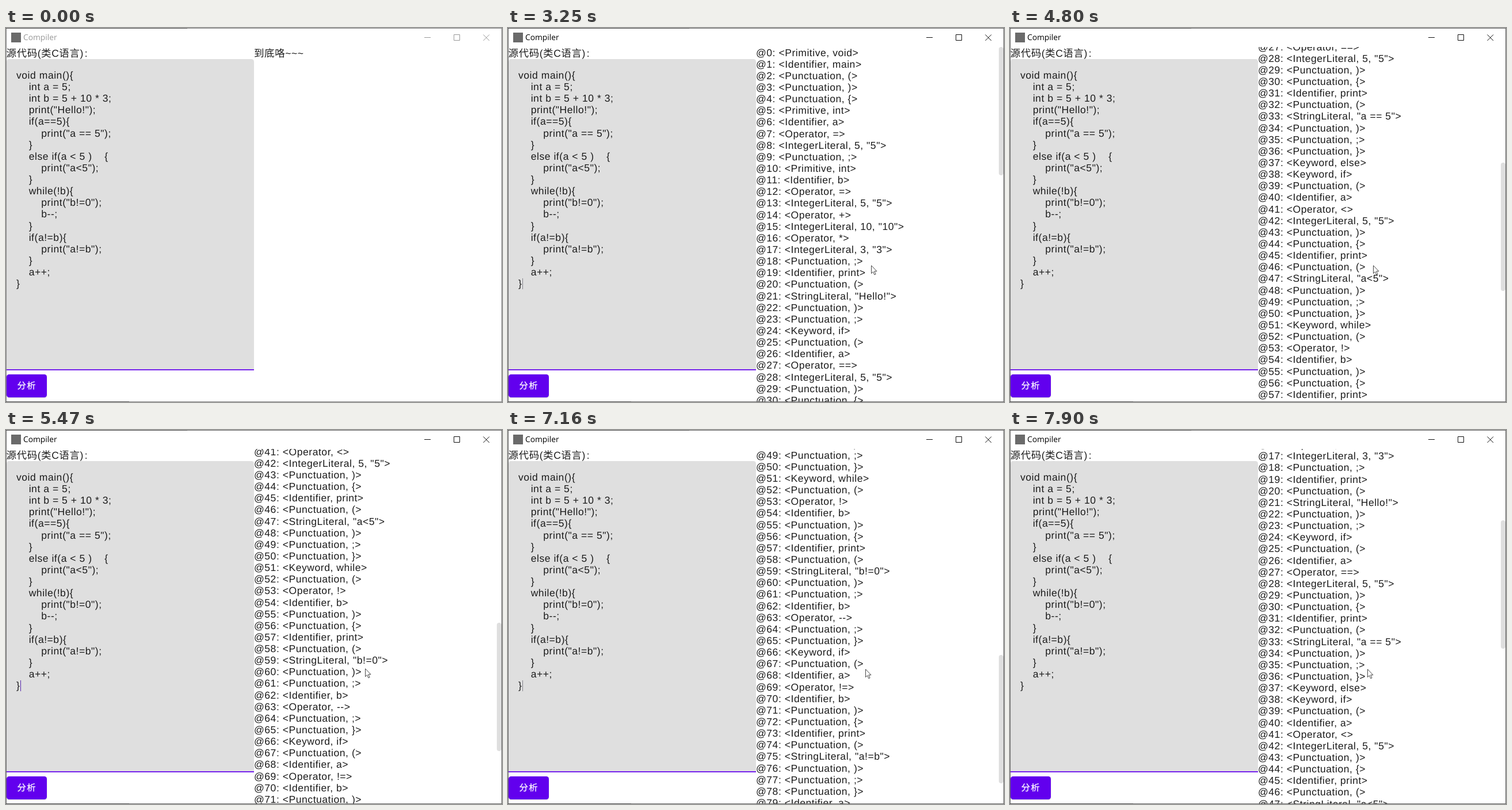
Animation, 862 px wide and 650 px high, one loop 8000 ms. Source, as an HTML page:

```html
<!DOCTYPE html>
<html lang="zh-CN">
<head>
<meta charset="utf-8">
<title>Compiler</title>
<style>
html, body { margin: 0; width: 100%; height: 100%; overflow: hidden; background: #fff; }
body {
  position: relative; color: #1c1c1c; cursor: default;
  font: 17.52px/20.14px "Liberation Sans", "Noto Sans CJK SC", "Noto Sans CJK", sans-serif;
  letter-spacing: .548px; text-rendering: geometricPrecision;
}
body > *, #thumb, #list, #ripple { position: absolute; }
#outline { inset: 0; border: 1px solid #858585; }
.on #outline { border-color: #6a6a6a; }
.edge { left: 0; height: 1px; background: #4a4a4a; }
#icon { left: 9px; top: 8px; width: 17px; height: 17px; background: #6a6a6a; }
#title {
  left: 30px; top: 7px; color: #999; letter-spacing: 0;
  font: 13.8px/20px "Open Sans", "Noto Sans", sans-serif;
}
.on #title { color: #000; }
#controls { left: 720px; top: 0; fill: none; stroke: #999; }
.on #controls { stroke: #111; }
#label { left: .5px; top: 34px; white-space: pre; }
#label span { margin-left: 2px; }
#field {
  left: 1px; top: 54px; width: 430px; height: 539px;
  background: #dfdfdf; border-bottom: 2px solid #7622ec; border-radius: 4.4px 4.4px 0 0;
}
#code { left: 18px; top: 71.8px; margin: 0; font: inherit; }
#caret { left: 24.5px; top: 434.5px; width: 1.1px; height: 19.5px; }
#button {
  left: .6px; top: 602.2px; width: 70.2px; height: 39.8px; overflow: hidden;
  background: #6200ee; border-radius: 4.4px; color: #fff;
  box-shadow: 0 1px 2px rgba(0,0,0,.15);
  font-size: 15.34px; line-height: 42px; letter-spacing: 1.37px;
  text-indent: 18.9px; -webkit-text-stroke: .3px #fff;
}
#button.hover { background: #7014ef; box-shadow: 0 2px 4px rgba(0,0,0,.28); }
#ripple { left: 32px; top: 11px; width: 0; height: 0; border-radius: 50%; background: #fff; }
#pane { left: 431px; top: 33px; width: 430px; height: 615.5px; overflow: hidden; }
#list { left: 0; top: 0; white-space: pre; }
#tokens { display: none; }
.listed #tokens { display: block; }
#end { padding-top: 1px; }
#thumb { display: none; right: 0; top: 0; width: 8.4px; height: 223px; background: #dfdfdf; border-radius: 4px; }
.listed #thumb { display: block; }
#cursor { left: 0; top: 0; }
</style>
</head>
<body>
<div id="outline"></div>
<div class="edge" style="top:0;width:315px"></div>
<div class="edge" style="bottom:0;width:214px"></div>
<div id="icon"></div>
<div id="title">Compiler</div>
<svg id="controls" width="140" height="33">
  <path d="M7 16.5H18M58.5 11.5H68.5V21.5H58.5ZM109.5 11.5L120 22M120 11.5L109.5 22"/>
</svg>
<div id="label">源代码(类C语言)<span>:</span></div>
<div id="field"></div>
<pre id="code">void main(){
    int a = 5;
    int b = 5 + 10 * 3;
    print("Hello!");
    if(a==5){
        print("a == 5");
    }
    else if(a &lt; 5 )    {
        print("a&lt;5");
    }
    while(!b){
        print("b!=0");
        b--;
    }
    if(a!=b){
        print("a!=b");
    }
    a++;
}</pre>
<div id="caret"></div>
<div id="button">分析<div id="ripple"></div></div>
<div id="pane">
  <div id="list"><div id="tokens"></div><div id="end">到底咯~~~</div></div>
  <div id="thumb"></div>
</div>
<svg id="cursor" width="12" height="19">
  <path d="M.5 .8V14.6L3.6 11.7L5.8 16.8L8 15.9L5.8 10.8H10Z" fill="#fff" stroke="#333" stroke-width=".9"/>
</svg>
<script>
const $ = id => document.getElementById(id);
const LOOP = 8000, NOTCH = 92.3, MAX = 1078.1, TRACK = 392, RISE = .4;
const CLICK = 2030, LISTED = 2150;
const downs = [3450, 3740, 4400, 4530, 4700, 4800, 4930, 5400, 5470, 5570, 5680, 5750];
const ups = [7160, 7230, 7300, 7360, 7430, 7730, 7820, 7900];
// time, x, y of the pointer tip
const path = [
  [330, 769, 640], [470, 730, 575], [600, 600, 533], [800, 330, 540], [1000, 110, 568],
  [1080, 45, 581], [1150, 40, 597], [1500, 33, 613], [2800, 33, 613], [3250, 631, 412],
  [5330, 631, 412], [5400, 624, 414], [6020, 624, 414], [6150, 621, 415], [LOOP, 621, 415]
];

function describe(token) {
  if (token[0] === '"') return `StringLiteral, ${token}`;
  if (/^\d/.test(token)) return `IntegerLiteral, ${token}, "${token}"`;
  const kind = /^(void|int)$/.test(token) ? 'Primitive'
    : /^(if|else|while)$/.test(token) ? 'Keyword'
    : /^\w/.test(token) ? 'Identifier'
    : /^[(){};]$/.test(token) ? 'Punctuation' : 'Operator';
  return `${kind}, ${token}`;
}

$('tokens').textContent = $('code').textContent
  .match(/"[^"]*"|\w+|==|!=|\+\+|--|\S/g)
  .map((token, i) => `@${i}: <${describe(token)}>`)
  .join('\n');

function pointerAt(t) {
  const q = Math.min(LOOP, Math.ceil(t / 70) * 70);
  const i = Math.max(1, path.findIndex(p => p[0] >= q));
  const [a, b] = [path[i - 1], path[i]];
  const k = Math.max(0, (q - a[0]) / (b[0] - a[0]));
  return [a[1] + (b[1] - a[1]) * k, a[2] + (b[2] - a[2]) * k];
}

const passed = (times, t) => times.filter(x => x <= t).length;

function draw(t) {
  document.body.className = (t >= CLICK ? 'on ' : '') + (t >= LISTED ? 'listed' : '');

  const scroll = Math.min(MAX, passed(downs, t) * NOTCH) - passed(ups, t) * NOTCH;
  $('list').style.top = -scroll - RISE + 'px';
  $('thumb').style.top = scroll / MAX * TRACK + 'px';

  const [x, y] = pointerAt(t);
  $('cursor').style.transform = `translate(${Math.round(x)}px, ${Math.round(y)}px)`;
  $('cursor').style.visibility = t < 330 ? 'hidden' : 'visible';

  const blink = (t - 2130) % 1000;
  $('caret').style.background = t < 2130 || blink >= 500 ? 'none' : blink < 200 ? '#85858c' : '#5a2bb0';

  $('button').className = t >= 1150 && t < 2840 ? 'hover' : '';
  const k = Math.min(1, Math.max(0, (t - CLICK) / 590));
  $('ripple').style.boxShadow = `0 0 0 ${8 + Math.min(1, k * 2.2) * 40}px #fff`;
  $('ripple').style.opacity = t < CLICK ? 0 : .24 * Math.min(1, 2 - 2 * k);
}

let start;
function frame(now) {
  start ??= now;
  draw((now - start) % LOOP);
  requestAnimationFrame(frame);
}
draw(0);
requestAnimationFrame(frame);
</script>
</body>
</html>
```
